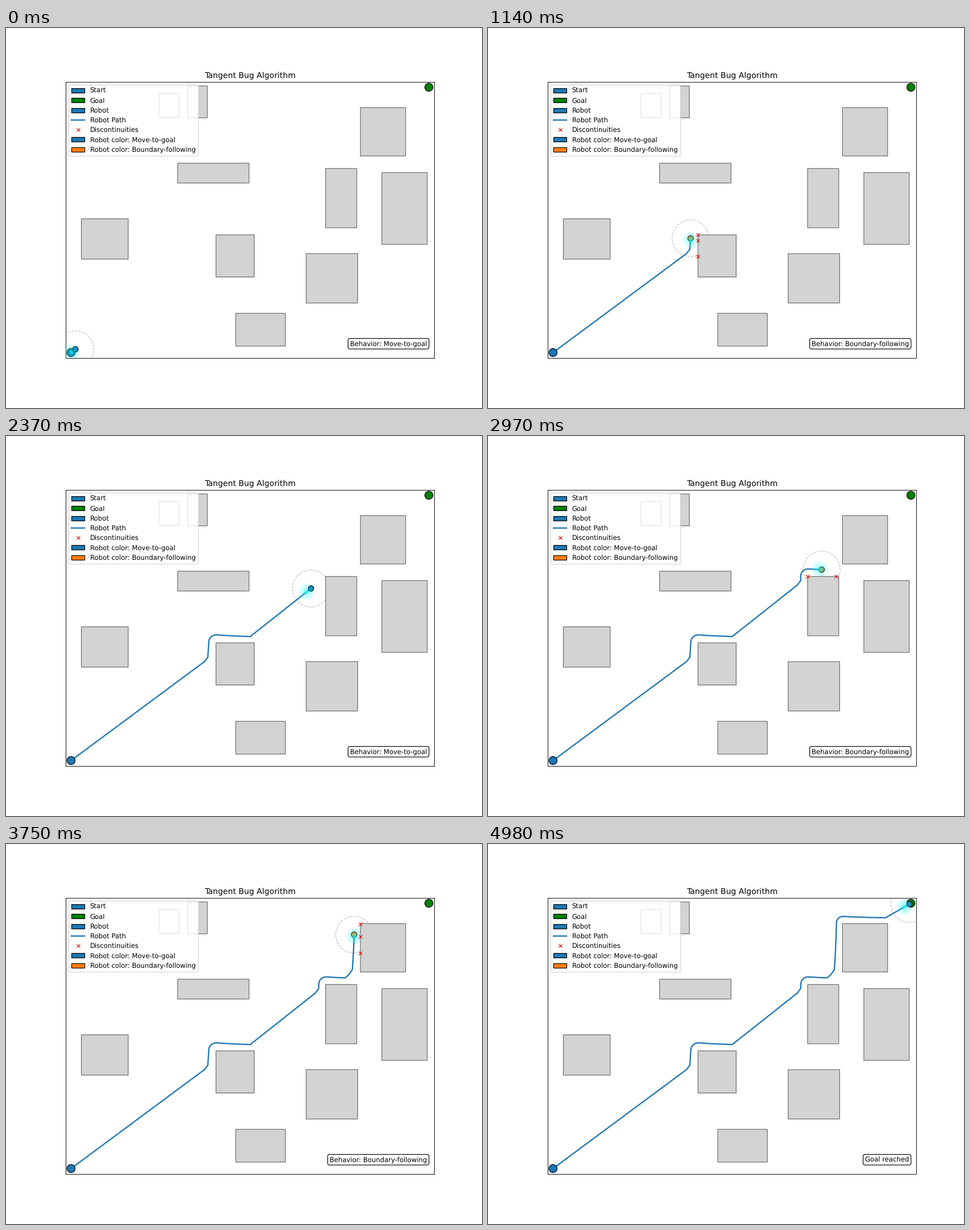
Animation of 837 by 669 pixels, one loop 5.01 s. Source, as a matplotlib script:

```python
import numpy as np
import matplotlib.pyplot as plt
from matplotlib.animation import FuncAnimation
from matplotlib.lines import Line2D
from matplotlib.patches import Circle, Patch, Rectangle

plt.rcParams["text.hinting"] = "no_hinting"

DPI = 83.7
FRAMES, INTERVAL = 167, 30
WIDTH, HEIGHT = 20, 15
START, GOAL = np.array([0.3, 0.3]), np.array([19.7, 14.7])
GOAL_STEP, WALL_STEP = 0.3, 0.1
CLEARANCE, SENSOR_RANGE, GLOW = 0.27, 1.0, 0.41
BLUE, ORANGE = "#1f77b4", "#ff7f0e"

# Steps spent, by turns, heading for the goal and following a wall
PHASES = 30, 36, 15, 22, 1, 57, 5

# Left, bottom, width, height
OBSTACLES = np.array([
    (0.86, 5.37, 2.54, 2.19), (6.08, 9.50, 3.87, 1.08),
    (8.16, 4.40, 2.07, 2.29), (9.23, 0.65, 2.69, 1.78),
    (13.05, 2.99, 2.79, 2.68), (14.10, 7.07, 1.69, 3.22),
    (17.15, 6.17, 2.46, 3.90), (15.99, 10.97, 2.45, 2.63),
    (5.07, 13.06, 1.09, 1.31), (6.62, 13.04, 1.07, 1.73),
])
LOW, HIGH = OBSTACLES[:, :2], OBSTACLES[:, :2] + OBSTACLES[:, 2:]


def unit(v):
    return v / np.hypot(*v)


def obstacle_ahead(pos):
    probe = pos + 0.4 * unit(GOAL - pos)
    gaps = probe - np.clip(probe, LOW, HIGH)
    return np.hypot(*gaps.T).argmin()


def wall_heading(pos, box, turning):
    """Clockwise along the box, easing towards the wanted clearance."""
    away = pos - np.clip(pos, LOW[box], HIGH[box])
    gap, normal = np.hypot(*away), unit(away)
    heading = np.array([normal[1], -normal[0]])
    heading -= 0.44 * (gap - CLEARANCE) * normal
    if turning:
        heading += 2 * unit(GOAL - pos)
    return unit(heading)


def build_route():
    route, following = [START], [False]
    for phase, steps in enumerate(PHASES):
        on_wall = phase % 2 == 1
        box = obstacle_ahead(route[-1])
        for step in range(steps):
            pos = route[-1]
            if on_wall:
                move = WALL_STEP * wall_heading(pos, box, step < 3)
            else:
                move = GOAL_STEP * unit(GOAL - pos)
            route.append(pos + move)
            following.append(on_wall)
    return np.array(route), following


def scan(pos):
    """Points where the obstacle seen by neighbouring rays changes."""
    angle = np.radians(np.arange(360) + 1e-6)
    rays = np.column_stack([np.cos(angle), np.sin(angle)])[:, None]
    a, b = (LOW - pos) / rays, (HIGH - pos) / rays
    near = np.minimum(a, b).max(axis=2)
    far = np.maximum(a, b).min(axis=2)
    reach = np.where((near <= far) & (near > 0), near, np.inf)
    depth, seen = reach.min(axis=1), reach.argmin(axis=1)
    hit = depth <= SENSOR_RANGE
    seen[~hit] = -1
    edge = (seen != np.roll(seen, 1)) | (seen != np.roll(seen, -1))
    edge[0] = True
    keep = hit & edge
    return pos + rays[keep, 0] * depth[keep, None]


def glow_image(n=54):
    """Cyan haze that thins out like a fan of faint rays."""
    axis = (np.arange(n) + 0.5) / n * 2 - 1
    r = np.hypot(*np.meshgrid(axis, axis))
    rgba = np.zeros((n, n, 4))
    rgba[..., 1:3] = 1
    rgba[..., 3] = np.where(r < 1, 1 - 0.97 ** (5 / np.maximum(r, 0.05)), 0)
    return rgba


route, following = build_route()

fig, ax = plt.subplots(figsize=(837 / DPI + 1e-9, 669 / DPI + 1e-9), dpi=DPI)
haze = ax.imshow(glow_image(), extent=(0, 1, 0, 1), interpolation="bilinear",
                 zorder=3)
ax.set(xlim=(0, WIDTH), ylim=(0, HEIGHT), aspect="equal", xticks=[], yticks=[])
ax.set_title("Tangent Bug Algorithm")


def add_box(x, y, w, h, z, fill="none", edge="none"):
    ax.add_patch(Rectangle((x, y), w, h, fc=fill, ec=edge, zorder=z,
                           snap=False))


def add_disc(center, radius, color, z):
    return ax.add_patch(Circle(center, radius, fc=color, ec="black", zorder=z))


for obstacle in OBSTACLES:
    add_box(*obstacle, 3.4, fill="lightgray")
    add_box(*obstacle, 3.6, edge="dimgray")
# Plain backing for the legend
add_box(0.2, 10.95, 7.0, 3.88, 3.5, fill="white")

sensor = ax.add_patch(Circle(START, SENSOR_RANGE, fill=False, ls="--",
                             ec="gray", alpha=0.5, zorder=1))
path, = ax.plot([], [], color=BLUE, lw=2, zorder=1.5)
add_disc(START, 0.22, BLUE, 2)
add_disc(GOAL, 0.22, "green", 2)
robot = add_disc(START, 0.15, BLUE, 2.5)
marks, = ax.plot([], [], "rx", zorder=4)
label = ax.text(0.98, 0.04, "", transform=ax.transAxes, ha="right",
                va="bottom", zorder=4.5,
                bbox=dict(boxstyle="round", fc="white", ec="black"))


def swatch(color, text):
    return Patch(fc=color, ec="black", label=text)


ax.legend(loc="upper left", labelspacing=0.485, handles=[
    swatch(BLUE, "Start"),
    swatch("green", "Goal"),
    swatch(BLUE, "Robot"),
    Line2D([], [], color=BLUE, lw=2, label="Robot Path"),
    Line2D([], [], color="red", marker="x", ls="none", label="Discontinuities"),
    swatch(BLUE, "Robot color: Move-to-goal"),
    swatch(ORANGE, "Robot color: Boundary-following"),
])


def update(i):
    k = min(i + 1, len(route) - 1)
    pos, last = route[k], route[k - 1]
    mode = "Boundary-following" if following[k] else "Move-to-goal"
    label.set_text("Goal reached" if i == FRAMES - 1 else f"Behavior: {mode}")
    robot.center = sensor.center = pos
    robot.set_facecolor(ORANGE if following[k] else BLUE)
    path.set_data(*route[:k + 1].T)
    marks.set_data(*scan(last).T)
    haze.set_extent((last[0] - GLOW, last[0] + GLOW,
                     last[1] - GLOW, last[1] + GLOW))
    ax.set(xlim=(0, WIDTH), ylim=(0, HEIGHT))
    return robot, sensor, path, marks, haze, label


anim = FuncAnimation(fig, update, frames=FRAMES, interval=INTERVAL,
                     repeat=True, repeat_delay=0)
plt.show()
```
